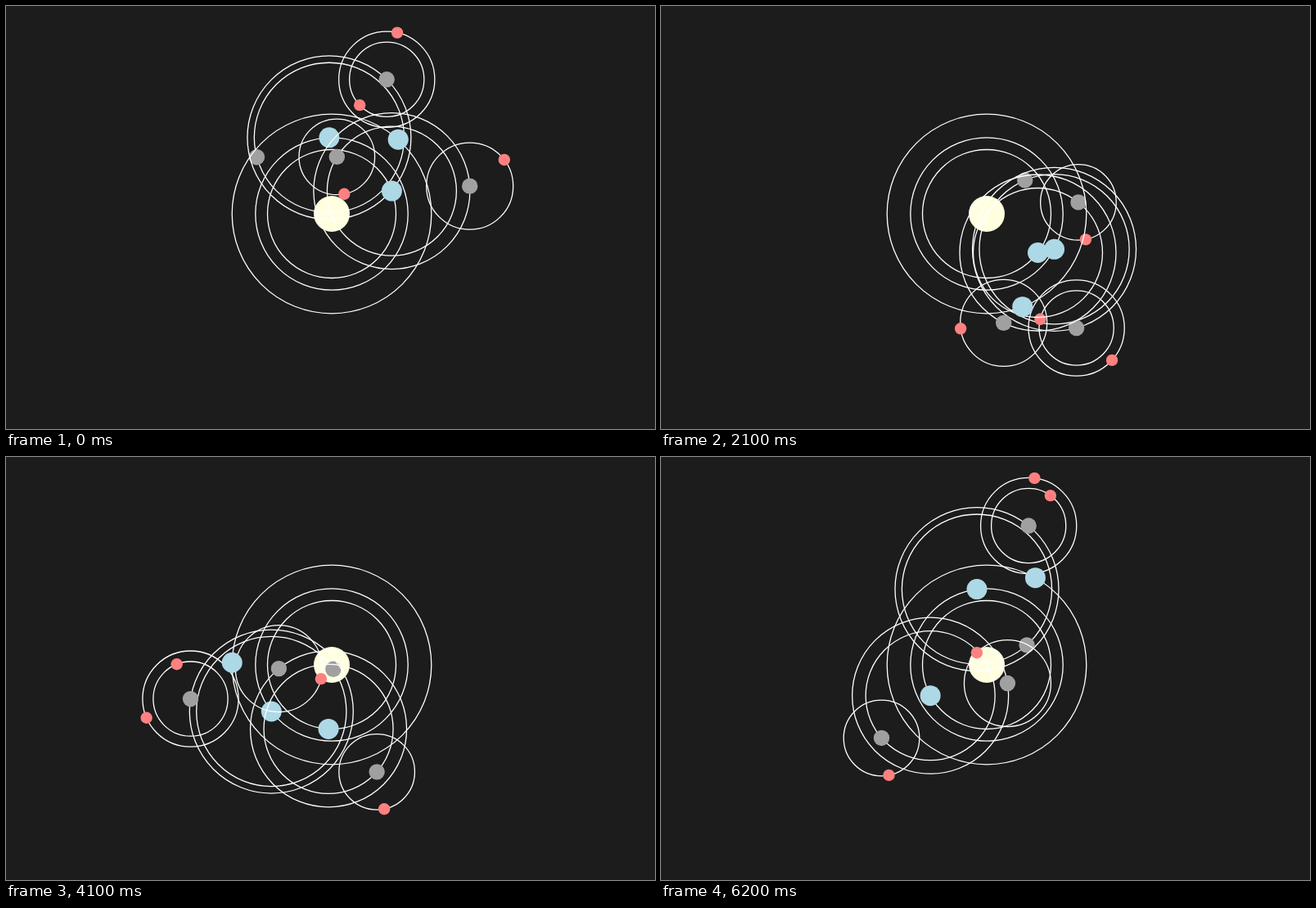
An HTML page with a canvas that plays this animation: 793x517 px, repeating every 6300 ms.

```html
<!DOCTYPE html>
<html lang="en">
<head>
<meta charset="utf-8">
<title>Orbits</title>
<style>
  html, body { margin: 0; width: 100%; height: 100%; overflow: hidden; background: #1c1c1c; }
  canvas { display: block; }
</style>
</head>
<body>
<canvas id="stage" width="793" height="517"></canvas>
<script>
const ctx = document.getElementById('stage').getContext('2d');
const LOOP = 6300, STEP = 100, LAG = 0.013;

// Each kind of body: radius and fill
const SUN = [22, '#ffffe0'];
const PLANET = [12.5, '#add8e6'];
const MOON = [9.7, '#a0a0a0'];
const SATELLITE = [7.2, '#ff8080'];

// orbit in px, start in degrees, speed in radians per second
const body = (kind, orbit, start, speed, children = []) =>
  ({ kind, orbit, start: start * Math.PI / 180, speed, children });

const planets = [
  body(PLANET, 93.2, -91.9, 1, [
    body(MOON, 91.6, 164.9, 0.6863),
    body(MOON, 100, -45.3, 1, [
      body(SATELLITE, 45.6, 136.5, 0.4776),
      body(SATELLITE, 58.6, -77.4, 1)
    ])
  ]),
  body(PLANET, 78.5, -20.8, 0.4855, [
    body(MOON, 79, 211.9, 0.81, [body(SATELLITE, 46.3, 78.8, 0)]),
    body(MOON, 95.5, -3.6, 1, [body(SATELLITE, 53, -37.4, 1.7554)])
  ]),
  body(PLANET, 121.8, -48.2, 0.98)
];

function circle(x, y, r) {
  ctx.beginPath();
  ctx.arc(x, y, r, 0, Math.PI * 2);
}

function disc(x, y, [radius, color]) {
  circle(x, y, radius);
  ctx.fillStyle = color;
  ctx.fill();
}

function drawBody(b, cx, cy, time) {
  const angle = b.start + b.speed * time;
  const x = cx + b.orbit * Math.cos(angle);
  const y = cy + b.orbit * Math.sin(angle);
  circle(cx, cy, b.orbit);
  ctx.stroke();
  disc(x, y, b.kind);
  b.children.forEach(child => drawBody(child, x, y, time));
}

function draw(ms) {
  const time = Math.max(0, Math.floor(ms % LOOP / STEP) * STEP / 1000 - LAG);
  ctx.fillStyle = '#1c1c1c';
  ctx.fillRect(0, 0, 793, 517);
  ctx.strokeStyle = '#fff';
  ctx.lineWidth = 1.3;
  disc(398, 254, SUN);
  planets.forEach(p => drawBody(p, 398, 254, time));
}

const begin = performance.now();
function tick() {
  draw(performance.now() - begin);
  requestAnimationFrame(tick);
}
tick();
</script>
</body>
</html>
```
